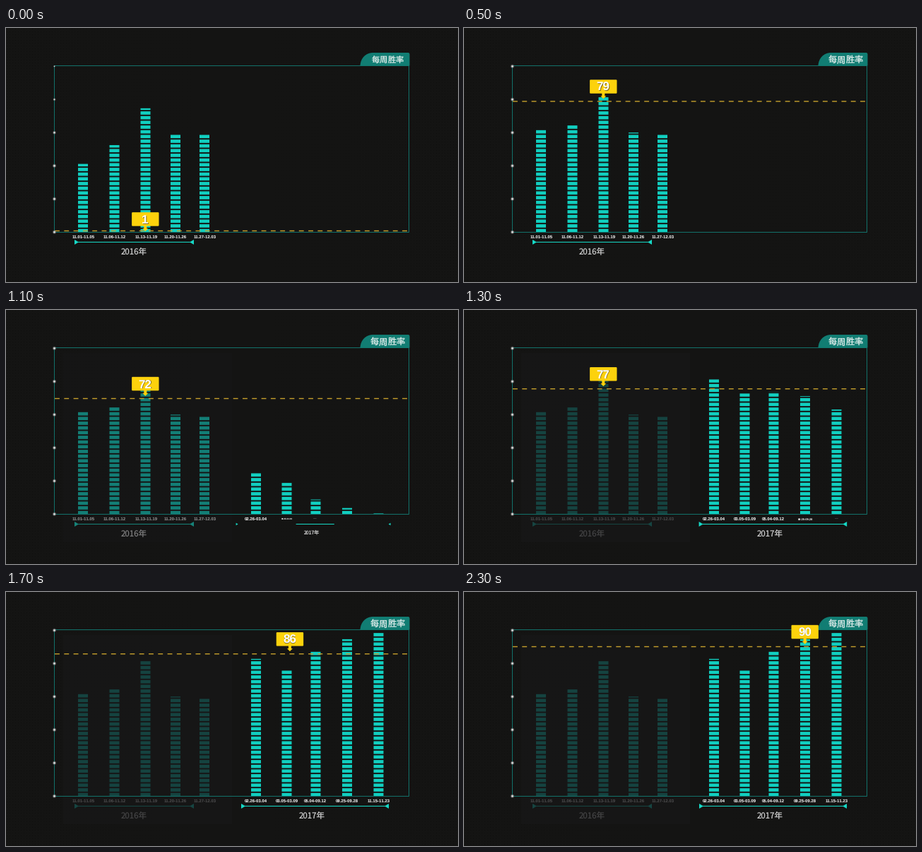
A matplotlib script that plays this animation: 640 by 360 pixels, repeating every 2.4 s.

```python
import numpy as np
import matplotlib.pyplot as plt
from matplotlib.animation import FuncAnimation
from matplotlib.collections import PolyCollection
from matplotlib.patches import (Circle, FancyBboxPatch, PathPatch, Polygon,
                                Rectangle)
from matplotlib.path import Path

plt.rcParams["text.hinting"] = "none"
plt.rcParams["text.hinting_factor"] = 1

W, H, DPI = 640, 360, 100
FRAMES, INTERVAL = 24, 100
BASE, LEFT, RIGHT, TOP = 289.5, 68.5, 570.5, 53.5
PITCH, SEGMENT, BAR_WIDTH = 20 / 3, 4.7, 14
TEAL, TAB, CYAN, VEIL = "#12716a", "#117d73", "#11cfc0", "#171718"
ARROW, GOLD, YELLOW, GREY = "#16d9c6", "#c6a02c", "#fdd20c", "#c9c9c9"
CJK, SANS = "Noto Sans CJK JP", "Liberation Sans"
DATE_SIZE = 6.2

# left edge, final top, date label
BARS_2016 = [(102, 144.8, "11.01-11.05"), (146.5, 138.1, "11.06-11.12"),
             (190.5, 98.1, "11.13-11.19"), (233, 148.2, "11.20-11.26"),
             (274, 151.5, "11.27-12.03")]
BARS_2017 = [(347, 94.8, "02.26-03.04"), (390.5, 111.5, "03.05-03.09"),
             (431.5, 84.8, "05.04-09.12"), (476, 66.9, "09.25-09.28"),
             (520.5, 58.1, "11.15-11.23")]
LABEL_X_2016 = [110, 153.5, 198.5, 239.5, 281.5]
LABEL_X_2017 = [354, 398, 438, 483, 527.5]
LEAD_2016 = [0.615, 0.726, 0.824, 0.917, 1]
LEAD_2017 = [0.363, 0.326, 0.198, 0.12, 0.04]

fig = plt.figure(figsize=(W / DPI, H / DPI), dpi=DPI, facecolor="#141413")
ax = fig.add_axes([0, 0, 1, 1])
ax.set(xlim=(0, W), ylim=(H, 0))
ax.axis("off")
moving = []


def smooth(u):
    u = np.clip(u, 0, 1)
    return u * u * (3 - 2 * u)


def mix(a, b, u):
    return a + (b - a) * u


def put(artist):
    artist.set_snap(False)
    ax.add_artist(artist)
    moving.append(artist)


def text(x, y, s, px, color="white", font=SANS, weight="normal", **kw):
    if px < 0.5:
        return
    moving.append(ax.text(x, y, s, fontsize=px * 72 / DPI, color=color,
                          family=font, weight=weight, ha="center",
                          va="center_baseline", **kw))


def rule(xs, ys, color, width=1, **kw):
    line, = ax.plot(xs, ys, color=color, lw=width * 72 / DPI, snap=False,
                    solid_capstyle="butt", dash_capstyle="butt", **kw)
    return line


def background():
    y, x = np.mgrid[0:H, 0:W]
    edge = np.clip(abs(x - W / 2) / 320 - 0.1, 0, 1)
    mesh = ((x % 4 == 1) & (y % 4 == 1)) * edge * 6
    shade = np.stack([20.5 - mesh, 20.5 - mesh, 19.5 - mesh], -1) / 255
    ax.imshow(shade, extent=(0, W, H, 0), aspect="auto", zorder=0)


def frame_and_tab():
    rule([LEFT, RIGHT, RIGHT, LEFT, LEFT], [TOP, TOP, BASE, BASE, TOP], TEAL,
         zorder=4)
    M, L, C = Path.MOVETO, Path.LINETO, Path.CURVE4
    points = [(501.5, 53.5), (502, 43), (509, 35), (520, 35), (569, 35),
              (571, 35), (571.5, 36), (571.5, 38), (571.5, 53.5)]
    ax.add_patch(PathPatch(Path(points, [M, C, C, C, L, C, C, C, L]),
                           fc=TAB, lw=0, zorder=7))


def bars(specs, growth):
    boxes = []
    for (x, top, _), g in zip(specs, growth):
        height = (BASE - top) * g
        for low in np.arange(0, height, PITCH):
            high = min(low + SEGMENT, height)
            boxes.append([(x, BASE - low), (x + BAR_WIDTH, BASE - low),
                          (x + BAR_WIDTH, BASE - high), (x, BASE - high)])
    if boxes:
        put(PolyCollection(boxes, facecolors=CYAN, lw=0, zorder=2))


def arrow_head(x, direction, size):
    y, d = 303.5, direction * size / 2
    put(Polygon([(x - d, y - size * 0.58), (x + d, y), (x - d, y + size * 0.58)],
                fc=ARROW, lw=0, zorder=3))


def span(x0, x1):
    moving.append(rule([x0, x1], [303.5, 303.5], ARROW, zorder=3))


def group_2016(k):
    bars(BARS_2016, [smooth(u + k / 3.6) for u in LEAD_2016])
    for x, (_, _, date) in zip(LABEL_X_2016, BARS_2016):
        text(x, 296, date, DATE_SIZE, weight="bold")
    span(98, 266)
    arrow_head(100, 1, 6)
    arrow_head(263, -1, 6)
    text(181.5, 315, "2016年", 11.5, GREY, CJK)
    # a dark veil pushes the finished year back
    put(Rectangle((81, 61), 239, 268, fc=VEIL, lw=0, zorder=3.5,
                  alpha=np.interp(k, [9.5, 11, 13], [0, 0.44, 0.76])))


def group_2017(k):
    bars(BARS_2017, [smooth(u + (k - 11) / 3.6) for u in LEAD_2017])
    for i, (x, (_, _, date)) in enumerate(zip(LABEL_X_2017, BARS_2017)):
        scale = np.clip(0.92 - 0.4 * i + (k - 11) / 2.2, 0, 1)
        text(x, 296, date, DATE_SIZE * scale, weight="bold")
    reveal = smooth((k - 9.8) / 3.6)
    if reveal > 0:
        span(437.7 - 104.5 * reveal, 437.7 + 104.5 * reveal)
        size = 6 * np.clip((k - 9.6) / 2.8, 0, 1)
        arrow_head(mix(324, 336, reveal), 1, size)
        arrow_head(mix(544.5, 539, reveal), -1, size)
    text(433.5, 315, "2017年", 11.5 * np.clip(0.6 + (k - 11) / 3, 0, 1),
         GREY, CJK)


def level(k):
    """Height of the average line and the number on its tag."""
    if k <= 5:
        u = smooth(k / 5)
        return mix(287.5, 104, u), mix(1, 79, u)
    if k <= 9:
        u = smooth((k - 5) / 4)
        return mix(104, 147, u), mix(79, 62, u)
    keys = [9, 11, 15, 19]
    return (np.interp(k, keys, [147, 125.5, 98, 77.5]),
            np.interp(k, keys, [62, 72, 82, 90]))


def marker(k):
    y, value = level(k)
    x = mix(197.3, 482.7, smooth((k - 13.3) / 5.7))
    moving.append(rule([69, 570], [y, y], GOLD, 1.4, zorder=5,
                       dashes=(4.9, 4.6)))
    top = y - np.interp(k, [0, 5], [26.3, 30.7])
    foot = top + 19.5
    put(FancyBboxPatch((x - 18.2, top + 1), 36.4, 17.5, fc=YELLOW, lw=0,
                       boxstyle="round,pad=1,rounding_size=1.2", zorder=8))
    put(Polygon([(x - 2, foot - 1), (x + 2, foot - 1), (x + 2, foot + 3.5),
                 (x + 4, foot + 3.5), (x, foot + 7.5), (x - 4, foot + 3.5),
                 (x - 2, foot + 3.5)], fc=YELLOW, lw=0, zorder=8))
    number = str(int(round(value)))
    text(x + 0.4, top + 10.2, number, 16.5, "#8a721a", weight="bold", zorder=9)
    text(x - 0.3, top + 9.6, number, 16.5, weight="bold", zorder=10)


def axis_dots(k):
    for i in range(6):
        y = 54.3 + 47 * i
        size = np.clip(0.5 + 0.2 * i + k / 2, 0, 1)
        for radius, color, alpha in ((2.6, "#8b8b8b", 0.45),
                                     (1.7, "#c4c4c4", 0.7),
                                     (0.9, "#ffffff", 0.9)):
            put(Circle((LEFT, y), radius * size, fc=color, lw=0, alpha=alpha,
                       zorder=6))


def draw(k):
    while moving:
        moving.pop().remove()
    group_2016(k)
    group_2017(k)
    axis_dots(k)
    marker(k)
    scale = min(1, 0.92 + 0.04 * k)
    for i, glyph in enumerate("每周胜率"):
        text(540.7 + (i - 1.5) * 12.4 * scale, 44.3, glyph, 12.4 * scale,
             "#dcebe9", CJK, zorder=8)
    return moving


background()
frame_and_tab()
animation = FuncAnimation(fig, draw, frames=FRAMES, interval=INTERVAL,
                          init_func=lambda: [], repeat=True, repeat_delay=0)
plt.show()
```
